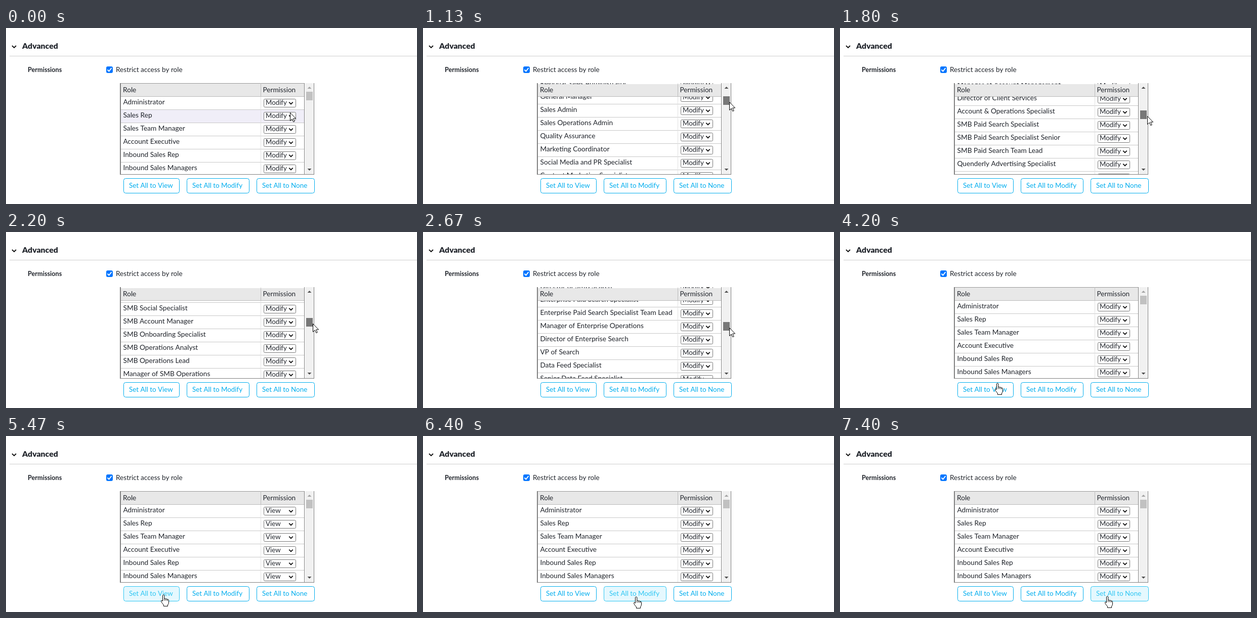
Write an HTML page with a canvas that moves like this. It is 812 px wide and 348 px high and loops after 8 s.

```html
<!DOCTYPE html>
<html lang="en">
<head>
<meta charset="utf-8">
<title>Role permissions</title>
<style>
  html, body { margin: 0; width: 812px; height: 348px; overflow: hidden; background: #fff; }
  canvas { display: block; }
</style>
</head>
<body>
<canvas width="812" height="348"></canvas>
<script>
const ctx = document.querySelector('canvas').getContext('2d');
const LOOP = 8000, STEP = 1000 / 15, ROW = 26, TOP = 136, INK = '#20242b';

const roles = `Administrator,Sales Rep,Sales Team Manager,Account Executive,Inbound Sales Rep,
Inbound Sales Managers,Outbound Sales Rep,Regional Sales Administrator,General Manager,Sales Admin,
Sales Operations Admin,Quality Assurance,Marketing Coordinator,Social Media and PR Specialist,
Content Marketing Specialist,Marketing Manager,Director of Marketing,Graphic Designer,Web Designer,
Web Developer,Development Manager,Billing Specialist,Billing Manager,Finance Director,HR Coordinator,
HR Manager,Recruiter,Training Specialist,Training Manager,Support Specialist,Support Team Lead,
Client Services Rep,Client Services Team Lead,Manager of Account Management,Director of Client Services,
Account & Operations Specialist,SMB Paid Search Specialist,SMB Paid Search Specialist Senior,
SMB Paid Search Team Lead,Quenderly Advertising Specialist,SMB Display Specialist,SMB Social Specialist,
SMB Account Manager,SMB Onboarding Specialist,SMB Operations Analyst,SMB Operations Lead,
Manager of SMB Operations,Director of SMB Search,Enterprise Paid Search Specialist,
Enterprise Paid Search Specialist Team Lead,Manager of Enterprise Operations,
Director of Enterprise Search,VP of Search,Data Feed Specialist,Senior Data Feed Specialist,
Data Feed Team Lead,Data Feed Manager,Reporting Analyst,Reporting Manager`.split(/,\s*/);

// Button: label, left, width, text x, hover start and end (in steps)
const buttons = [
  ['Set All to View', 232, 110, 243, 63, 84],
  ['Set All to Modify', 357, 123, 368, 84, 109],
  ['Set All to None', 495, 114, 506, 109, 999]
];

// Keys: step, values
const cursorKeys = [
  [0, 561, 167], [8, 608, 137], [10, 608, 137], [12, 606, 137], [14, 606, 137], [17, 605, 146],
  [27, 607, 174], [40, 605, 189], [52, 606, 137], [53, 606, 137], [63, 311, 298], [66, 302, 310],
  [76, 302, 310], [78, 305, 311], [81, 305, 311], [82, 311, 313], [87, 421, 317],
  [106, 421, 317], [111, 528, 316]
];
const scrollKeys = [[14, 0], [17, 219], [27, 892], [40, 1261], [52, 0]];

const arrow = new Path2D('M.5 .5V16.5L4.2 13L6.8 18.6L9.2 17.6L6.7 12H11.6Z');
const hand = new Path2D('M3.5 2Q5 -.5 6.8 2V8.6Q8.5 7.6 9.8 9.2Q11.5 8.4 12.8 10' +
  'Q15.3 9.6 15.5 12V16Q15.5 18.5 13.5 21V23.5H5.5V21Q2.5 18 .8 14.5Q0 12 2 12L3.5 13.5Z');
const knuckles = new Path2D('M6.8 8.6V12.5M9.8 9.2V12.5M12.8 10V13');

const clamp = v => Math.max(0, Math.min(1, v));
const smooth = v => v * v * (3 - 2 * v);

function valueAt(keys, n, ease = v => v) {
  const i = keys.findIndex(k => k[0] > n);
  if (i === 0) return keys[0].slice(1);
  if (i < 0) return keys.at(-1).slice(1);
  const a = keys[i - 1], b = keys[i], f = ease((n - a[0]) / (b[0] - a[0]));
  return a.slice(1).map((v, j) => v + (b[j + 1] - v) * f);
}

function rect(x, y, w, h, color) {
  ctx.fillStyle = color;
  ctx.fillRect(x, y, w, h);
}

function box(x, y, w, h, r, fill, stroke) {
  ctx.beginPath();
  ctx.roundRect(x + .5, y + .5, w, h, r);
  ctx.fillStyle = fill;
  ctx.fill();
  ctx.strokeStyle = stroke;
  ctx.lineWidth = 1;
  ctx.stroke();
}

function text(str, x, y, size = 13.7, color = INK, weight = 400) {
  ctx.font = `${weight} ${size}px Lato, sans-serif`;
  ctx.fillStyle = color;
  ctx.fillText(str, x, y);
}

function polyline(points, color, width) {
  ctx.beginPath();
  points.forEach(p => ctx.lineTo(...p));
  ctx.strokeStyle = color;
  ctx.lineWidth = width;
  ctx.stroke();
}

const chevron = (x, y, r) => polyline([[x - r, y - r / 2], [x, y + r / 2], [x + r, y - r / 2]], '#111', 1.9);

function triangle(x, y, dir, color) {
  ctx.beginPath();
  ctx.moveTo(x - 4, y);
  ctx.lineTo(x + 4, y);
  ctx.lineTo(x, y + 4 * dir);
  ctx.fillStyle = color;
  ctx.fill();
}

function drawForm() {
  rect(0, 0, 812, 348, '#fff');
  chevron(16, 37, 4);
  text('Advanced', 32, 41, 15.8, INK, 900);
  rect(7, 55, 805, 1, '#ccc');
  text('Permissions', 43, 87, 12.7, INK, 700);
  box(198, 76, 12, 12, 2, '#0075ff', '#0075ff');
  polyline([[200.5, 82.5], [203.5, 85.5], [208.5, 79]], '#fff', 2);
  text('Restrict access by role', 217, 87, 13.6);
}

function drawTable(scroll, hovered, choice) {
  ctx.save();
  ctx.beginPath();
  ctx.rect(226, 109, 364, 180);
  ctx.clip();
  roles.forEach((role, i) => {
    const y = Math.round(TOP + i * ROW - scroll);
    if (y < 80 || y > 290) return;
    if (i === hovered) rect(227, y, 362, 25, '#f0eef8');
    rect(227, y + 25, 362, 1, '#c8c8c8');
    rect(503, y, 1, 26, '#e0e0e0');
    text(role, 231.5, y + 15);
    box(509, y + 4, 63, 16, 2, '#fff', '#767676');
    text(choice, 513, y + 16, 13.3);
    chevron(563, y + 12.5, 3.7);
  });
  const top = scroll > 0 ? 111 : 109;
  rect(226, top, 364, 135 - top, '#e8e8e8');
  if (!scroll) rect(226, 109, 364, 1, '#999');
  rect(226, 135, 364, 1, '#bbb');
  rect(503, top, 1, 135 - top, '#bbb');
  rect(589, 109, 1, 180, '#808080');
  text('Role', 231, 127);
  text('Permission', 507.5, 127, 13.6);
  ctx.restore();
}

function drawScrollbar(scroll, color) {
  rect(591, 109, 17, 180, '#f1f1f1');
  triangle(599.5, 120, -1, scroll > 0 ? '#505050' : '#a3a3a3');
  triangle(599.5, 278, 1, '#505050');
  rect(593, Math.round(126 + scroll / 24.25), 13, 17, color);
  rect(225, 109, 2, 181, '#808080');
  rect(608, 109, 1, 181, '#808080');
  rect(225, 289, 384, 1, '#808080');
}

function drawButtons(n) {
  for (const [label, x, w, textX, from, to] of buttons) {
    const a = clamp((n - from) / 2) - clamp((n - to) / 2);
    const mix = (p, q) => p + (q - p) * a;
    const blue = `rgb(${mix(0, 45)},${mix(173, 198)},${mix(238, 243)})`;
    box(x, 297, w, 29, 4, `rgb(${mix(255, 229)},${mix(255, 248)},${mix(255, 254)})`, blue);
    text(label, textX, 316, 13.4, blue);
  }
}

function drawCursor(x, y) {
  const pointing = y >= 297 && buttons.some(b => x >= b[1] && x <= b[1] + b[2]);
  const shape = pointing ? hand : arrow;
  ctx.save();
  ctx.translate(Math.round(x) - (pointing ? 5 : 0), Math.round(y));
  ctx.lineWidth = 1;
  ctx.fillStyle = '#fff';
  ctx.strokeStyle = '#000';
  ctx.fill(shape);
  ctx.stroke(shape);
  if (pointing) ctx.stroke(knuckles);
  ctx.restore();
}

function draw(n) {
  const [scroll] = valueAt(scrollKeys, n);
  let [x, y] = valueAt(cursorKeys, n, smooth);
  const dragging = n >= 12 && n < 53;
  if (dragging) y = 137 + scroll / 24.25;
  const overRows = !dragging && x < 590 && y >= TOP && y < 289;
  const overThumb = x >= 593 && y >= 126 && y < 143;
  drawForm();
  drawTable(scroll, overRows ? Math.floor((y - TOP) / ROW) : -1, n >= 72 && n < 96 ? 'View' : 'Modify');
  drawScrollbar(scroll, dragging ? '#787878' : overThumb ? '#a8a8a8' : '#c1c1c1');
  drawButtons(n);
  drawCursor(x, y);
}

function tick() {
  draw(Math.floor((performance.now() % LOOP + 5) / STEP));
  requestAnimationFrame(tick);
}
tick();
</script>
</body>
</html>
```
